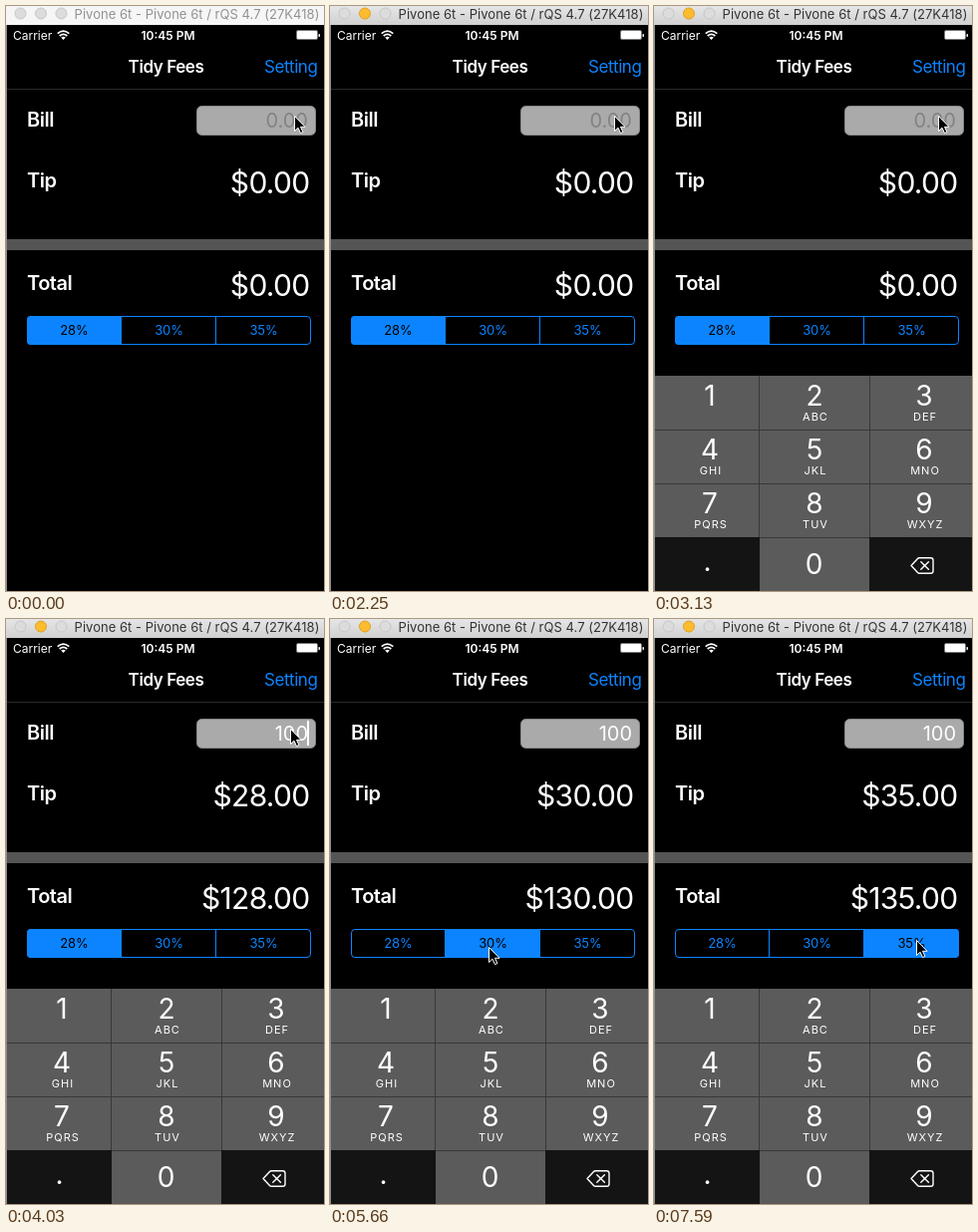
An HTML page that plays this animation: 319x587 px, repeating every 8000 ms.

```html
<!DOCTYPE html>
<html lang="en">
<head>
<meta charset="utf-8">
<title>Tip calculator</title>
<style>
  html, body { margin: 0; width: 100%; height: 100%; overflow: hidden; background: #000; }
  svg { display: block; width: 319px; height: 587px; }
  text { font-family: Inter, Roboto, sans-serif; fill: #fff; white-space: pre; }
  .mid { text-anchor: middle; }
  .end { text-anchor: end; }
  .caption { font-size: 13px; letter-spacing: .03px; fill: #929292; }
  .active .caption { fill: #333; }
  .bar { fill: #f6f6f6; }
  .active .bar { fill: url(#chrome); }
  .dot { fill: #dcdcdc; stroke: #c6c6c6; }
  .active .min { fill: #fdbc2f; stroke: #dfa023; }
  .status { font-size: 12px; }
  .nav { font-size: 17px; letter-spacing: -.42px; }
  .bold { font-weight: 600; }
  .label { font-size: 20px; font-weight: 600; letter-spacing: -.5px; }
  .sum { font-size: 30px; letter-spacing: -.7px; text-anchor: end; }
  .bill { font-size: 20px; text-anchor: end; }
  .bill.empty { fill: #828286; }
  .blue { fill: #0c84ff; }
  .seg rect { fill: none; }
  .seg text { font-size: 13px; letter-spacing: -.15px; fill: #0c84ff; text-anchor: middle; }
  .seg.on rect { fill: #0c84ff; }
  .seg.on text { fill: #000; }
  .digit { font-size: 28px; text-anchor: middle; }
  .letters { font-size: 11px; letter-spacing: 1px; text-anchor: middle; }
</style>
</head>
<body>
<svg viewBox="0 0 319 587">
  <defs>
    <linearGradient id="chrome" x2="0" y2="1">
      <stop stop-color="#e6e6e6"/><stop offset="1" stop-color="#d0d0d0"/>
    </linearGradient>
    <clipPath id="round"><rect x="21" y="311" width="285" height="29" rx="4"/></clipPath>
  </defs>
  <rect width="319" height="587"/>
  <rect y="18" width="1" height="569" fill="#8c8c8c"/>

  <g id="window">
    <rect class="bar" width="319" height="19"/>
    <circle class="dot" cx="14.5" cy="7.5" r="5.5"/>
    <circle class="dot min" cx="35" cy="7.5" r="5.5"/>
    <circle class="dot" cx="55.5" cy="7.5" r="5.5"/>
    <text class="caption mid" x="191.5" y="13">Pivone 6t - Pivone 6t / rQS 4.7 (27K418)</text>
  </g>

  <text class="status" x="7" y="34">Carrier</text>
  <g fill="none" stroke="#fff" stroke-width="1.7">
    <path d="M51.7 27.6Q57.5 22.6 63.3 27.6M53.7 30Q57.5 26.6 61.3 30"/>
    <path d="M57.5 34L55.2 31.5Q57.5 29.8 59.8 31.5Z" fill="#fff" stroke="none"/>
  </g>
  <text class="status bold mid" x="162.5" y="34">10:45 PM</text>
  <rect x="291.5" y="24.5" width="21" height="9" rx="1.5" fill="#fff" stroke="#777"/>
  <rect x="313.5" y="28" width="1.5" height="3" rx=".7" fill="#fff"/>

  <text class="nav bold mid" x="160.5" y="67">Tidy Fees</text>
  <text class="nav blue end" x="312.5" y="67">Setting</text>
  <rect x="1" y="83" width="318" height="1" fill="#2a2a2a"/>

  <text class="label" x="21" y="121">Bill</text>
  <text class="label" x="21" y="182">Tip</text>
  <text class="label" x="21" y="285">Total</text>
  <rect x="191.5" y="100.5" width="119" height="29" rx="5" fill="#aaa" stroke="#888"/>
  <text id="bill" class="bill" x="303" y="122"></text>
  <rect id="caret" x="302" y="102" width="2" height="25" fill="#fff"/>
  <text id="tip" class="sum" x="304.5" y="188"></text>
  <rect x="1" y="234" width="318" height="11" fill="#555"/>
  <text id="total" class="sum" x="304.5" y="291"></text>

  <g id="segments" clip-path="url(#round)"></g>
  <path d="M115.5 311V340M210.5 311V340" stroke="#0c84ff"/>
  <rect x="21.5" y="311.5" width="284" height="28" rx="3.5" fill="none" stroke="#0c84ff"/>

  <g id="pad">
    <rect x="1" y="371" width="318" height="216" fill="#5b5b5b"/>
    <path d="M1 425.5H319M1 479.5H319M1 533.5H319M105.5 371V587M216.5 371V587" stroke="#383838"/>
    <path d="M1 533H106V587H1ZM216 533H319V587H216Z" fill="#141414"/>
    <g id="keys"></g>
    <text class="digit" x="53.5" y="567">.</text>
    <g fill="none" stroke="#fff" stroke-width="1.4" stroke-linejoin="round" stroke-linecap="round">
      <path d="M258 561.5L264.5 554.5Q265.2 553.7 266.3 553.7H277.5Q280 553.7 280 556V567Q280 569.3 277.5 569.3H266.3Q265.2 569.3 264.5 568.5Z"/>
      <path d="M267.8 557.7L275.4 565.3M275.4 557.7L267.8 565.3"/>
    </g>
  </g>

  <path id="cursor" d="M.5 .5V15.5L4 12.2L6.5 17.6L8.9 16.5L6.5 11.3H11Z" stroke="#fff" stroke-width="1"/>
</svg>

<script>
const LOOP = 8000, STEP = 140;          // motion advances once per STEP ms
const FOCUS = 2400, BLINK = 980, LIT = 600;
const presses = [3430, 3880, 4030];     // keys 1, 0, 0
const taps = [5510, 6550];              // next rate selected
const rates = [28, 30, 35];
const $ = id => document.getElementById(id);

function add(parent, tag, attrs, text = '') {
  const el = document.createElementNS('http://www.w3.org/2000/svg', tag);
  for (const k in attrs) el.setAttribute(k, attrs[k]);
  el.textContent = text;
  return parent.appendChild(el);
}

const segs = rates.map((rate, i) => {
  const g = add($('segments'), 'g', { class: 'seg' });
  add(g, 'rect', { x: 21 + 95 * i, y: 311, width: 95, height: 29 });
  add(g, 'text', { x: 68.5 + 95 * i, y: 330 }, rate + '%');
  return g;
});

const columns = [56, 161, 271];
['', 'ABC', 'DEF', 'GHI', 'JKL', 'MNO', 'PQRS', 'TUV', 'WXYZ'].forEach((letters, i) => {
  const x = columns[i % 3], y = 371 + 54 * Math.floor(i / 3);
  add($('keys'), 'text', { class: 'digit', x, y: y + 30 }, i + 1);
  add($('keys'), 'text', { class: 'letters', x: x + 1, y: y + 45 }, letters);
});
add($('keys'), 'text', { class: 'digit', x: 160.5, y: 570 }, 0);

const moves = [
  { start: 450, steps: 3, x: 265, y: 120 },
  { start: 900, steps: 4, x: 285, y: 110 },
  { start: 4630, steps: 5, x: 159, y: 329 },
  { start: 5810, steps: 4, x: 263, y: 322 }
];

const stepsSince = (t, start) => Math.max(0, Math.floor((t - start) / STEP) + 1);
const smooth = p => p * p * (3 - 2 * p);
const past = (times, t) => times.filter(time => time <= t);
const money = n => '$' + n.toFixed(2);

function pointer(t) {
  let x = 289, y = 110;
  for (const m of moves) {
    const p = smooth(Math.min(1, stepsSince(t, m.start) / m.steps));
    x += (m.x - x) * p;
    y += (m.y - y) * p;
  }
  return `translate(${Math.round(x)} ${Math.round(y)})`;
}

function caretOn(t) {
  const reset = past([FOCUS, ...presses], t).pop();
  return (t - reset) % BLINK < LIT;     // false before focus
}

function draw(t) {
  const typed = past(presses, t).length, pick = past(taps, t).length;
  const bill = typed && 10 ** (typed - 1);
  const tip = bill * rates[pick] / 100;
  const padY = 216 * Math.exp(-.54 * stepsSince(t, FOCUS) ** 2);

  $('window').setAttribute('class', t >= 2250 ? 'active' : '');
  $('bill').textContent = bill || '0.00';
  $('bill').classList.toggle('empty', !bill);
  $('tip').textContent = money(tip);
  $('total').textContent = money(bill + tip);
  $('caret').setAttribute('opacity', +caretOn(t));
  $('pad').setAttribute('transform', `translate(0 ${Math.round(padY)})`);
  $('cursor').setAttribute('transform', pointer(t));
  segs.forEach((g, i) => g.classList.toggle('on', i === pick));
}

const start = performance.now();
function tick() {
  draw((performance.now() - start) % LOOP);
  requestAnimationFrame(tick);
}
tick();
</script>
</body>
</html>
```
